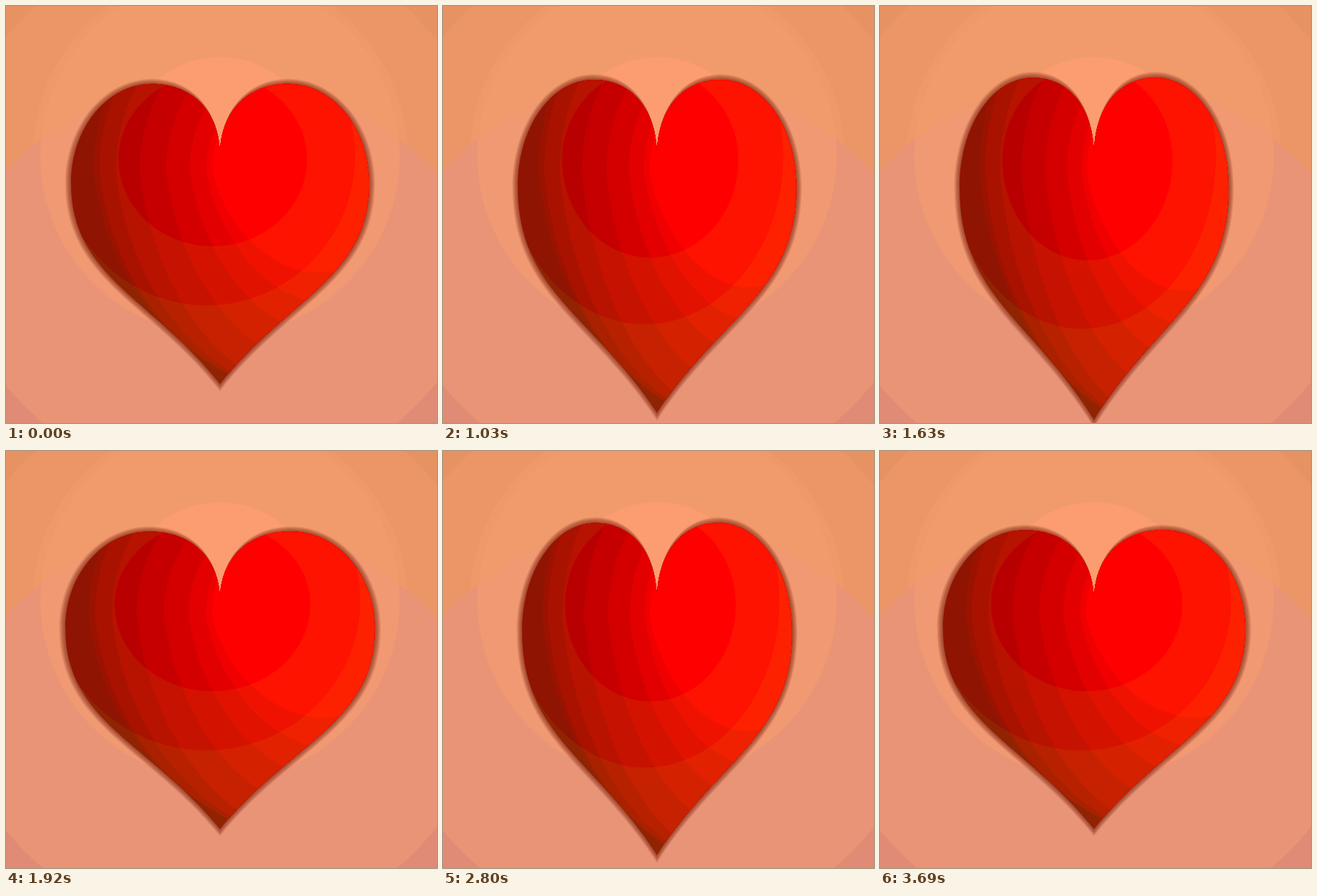
An HTML page with a canvas that plays this animation: 590 by 571 pixels, repeating every 3920 ms.

```html
<!DOCTYPE html>
<html lang="en">
<head>
<meta charset="utf-8">
<title>Beating heart</title>
<style>
  html, body { margin: 0; width: 100%; height: 100%; overflow: hidden; background: #e99377; }
  canvas { display: block; width: 100vw; height: 100vh; }
</style>
</head>
<body>
<canvas id="stage" width="590" height="571"></canvas>
<script>
const ctx = document.getElementById('stage').getContext('2d');
const W = 590, H = 571, CX = 293, CLEFT = 205;
const LOOP = 3920, STEPS = 26, BANDS = 8;
const SHORT = [2, 6, 10, 15, 17, 19]; // steps of 140 ms, the others last 150 ms

// Poses at rest: step, half width, tip
const RESTS = [
  [0, 210, 525], [3, 216, 523], [9, 219, 537], [13, 218, 525],
  [17, 213, 527], [21, 225.5, 508], [25, 213, 525]
];

const starts = [0];
for (let i = 0; i < STEPS - 1; i++) starts.push(starts[i] + (SHORT.includes(i) ? 140 : 150));

const mix = (a, b, u) => a + (b - a) * u;

// Between two rests the heart stretches once, getting taller and narrower.
function poseAt(step) {
  const i = Math.max(1, RESTS.findIndex(r => r[0] >= step));
  const a = RESTS[i - 1], b = RESTS[i], gap = b[0] - a[0];
  const u = (step - a[0]) / gap;
  const beat = Math.min(1, gap / 4) * Math.sin(Math.PI * u) ** 2;
  const half = mix(a[1], b[1], u) - 29 * beat;
  const tip = mix(a[2], b[2], u) + 44 * beat;
  return { half, tip, top: 101.5 + (half - 210) * .45 };
}

// Maps a point of the resting heart to the given pose.
function warp({ half, top, tip }) {
  return (x, y) => [
    CX + (x - CX) * half / 210,
    CLEFT + (y - CLEFT) * (y < CLEFT ? (CLEFT - top) / 104 : (tip - CLEFT) / 320)
  ];
}

// Heart outline, moved inwards by d everywhere but at the cleft
function heart(map, d) {
  const left = [
    [[CX, 145 + d * .2], [257, 101 + d * .9], [200, 101 + d * .9]],
    [[135 + d * .5, 101 + d * .9], [83 + d, 165 + d * .4], [83 + d, 243]],
    [[83 + d, 375 - d * .6], [198 + d * .4, 404 - d * .7], [CX, 525 - d * 1.2]]
  ];
  const mirror = ([x, y]) => [2 * CX - x, y];
  const curve = pts => ctx.bezierCurveTo(...pts.flatMap(p => map(...p)));
  const [a, b, c] = left.map(s => s.map(mirror));
  ctx.beginPath();
  ctx.moveTo(...map(CX, CLEFT));
  left.forEach(curve);
  curve([c[1], c[0], b[2]]);
  curve([b[1], b[0], a[2]]);
  curve([a[1], a[0], [CX, CLEFT]]);
  ctx.closePath();
}

// Ellipse with its own radius up and down, the lower part leaning right
function egg(map, cx, cy, rx, up, down, lean = 0) {
  for (let i = 0; i < 96; i++) {
    const t = i / 96 * 2 * Math.PI, s = Math.sin(t);
    const p = map(cx + rx * Math.cos(t) + lean * Math.max(0, s), cy + s * (s < 0 ? up : down));
    i ? ctx.lineTo(...p) : ctx.moveTo(...p);
  }
  ctx.closePath();
}

function disc(x, y, r, color) {
  ctx.beginPath();
  ctx.arc(x, y, r, 0, 2 * Math.PI);
  ctx.fillStyle = color;
  ctx.fill();
}

function backdrop() {
  ctx.fillStyle = '#e69263';
  ctx.fillRect(0, 0, W, H);
  disc(CX, 281, 378, '#ec9668');
  disc(CX, CLEFT, 256, '#ef986a');
  disc(CX, CLEFT, 246, '#f19a6c');
  ctx.save();
  disc(CX, 505, 405, '#df8b75');
  ctx.clip();
  disc(CX, 281, 378, '#e99477');
  disc(CX, CLEFT, 246, '#f19972');
  ctx.restore();
  disc(CX, CLEFT, 135, '#fb9d70');
}

// Nested red bands, from the widest and darkest to the brightest
function reds(map) {
  for (let n = BANDS - 1; n >= 0; n--) {
    const edge = 282 - 81 * (1 - Math.cos(Math.PI * n / 7));
    const rx = 116 + 20 * n;
    ctx.beginPath();
    egg(map, edge + rx, 225, rx, 125 + 22 * n, Math.min(140 + 42 * n, 300), 30);
    ctx.fillStyle = `rgb(${254 - 14 * n}, 0, 0)`;
    ctx.fill();
  }
}

// Adds green outside an oval, which turns the red towards orange.
function warm(map, green, ...oval) {
  ctx.globalCompositeOperation = 'lighter';
  ctx.beginPath();
  ctx.rect(0, 0, W, H);
  egg(map, ...oval);
  ctx.fillStyle = `rgb(0, ${green}, 0)`;
  ctx.fill('evenodd');
}

function draw(step) {
  const map = warp(poseAt(step));
  backdrop();

  ctx.fillStyle = 'rgba(120, 30, 12, .11)';
  for (let d = -2; d < 6; d++) {
    heart(map, d);
    ctx.fill();
  }

  ctx.save();
  heart(map, 6);
  ctx.fillStyle = 'rgb(144, 2, 2)';
  ctx.fill();
  ctx.clip();
  reds(map);
  warm(map, 18, 283, 210, 129, 118, 119);
  warm(map, 15, 275, 205, 203, 203, 205);
  ctx.restore();
}

let shown = -1;
function tick() {
  const t = performance.now() % LOOP;
  let step = STEPS - 1;
  while (starts[step] > t) step--;
  if (step !== shown) draw(shown = step);
  requestAnimationFrame(tick);
}
tick();
</script>
</body>
</html>
```
